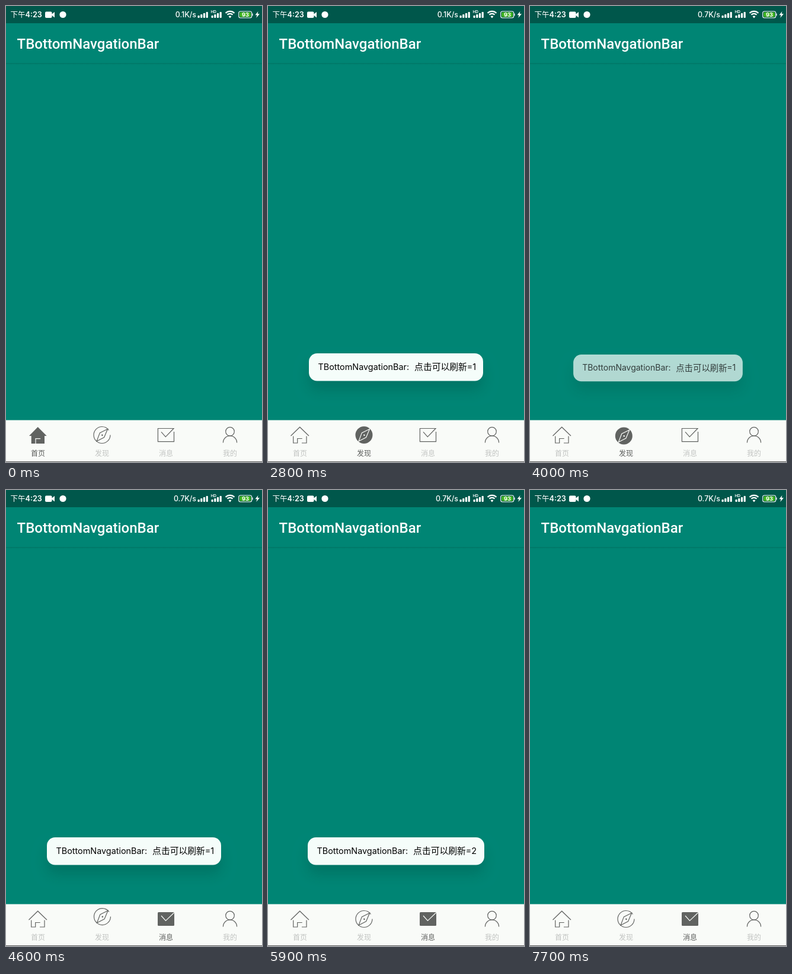
These frames come from a looping animation (432 px wide and 768 px high, 7.8 s). An HTML page with a canvas:

```html
<!DOCTYPE html>
<html lang="zh-CN">
<head>
<meta charset="utf-8">
<title>TBottomNavgationBar</title>
<style>
html, body { margin: 0; width: 100%; height: 100%; overflow: hidden; background: #008574; }
canvas { display: block; width: 432px; height: 768px; }
</style>
</head>
<body>
<canvas id="stage" width="432" height="768"></canvas>
<script>
const ctx = document.getElementById('stage').getContext('2d');
const LOOP = 7800, STEP = 100, FADE = 250, SHAKE = 900;
const TEAL = '#008574', DARK = '#00574b', PAPER = '#f9fbf8', INK = '#616361';
const LATIN = 'Inter, sans-serif', CJK = '"Noto Sans CJK SC", "Noto Sans CJK", sans-serif';
const LABELS = ['首页', '发现', '消息', '我的'];

// number shown, start of fade-in, start of fade-out
const TOASTS = [[0, 990, 2200], [1, 2370, 3600], [1, 3882, 4700], [2, 4982, 7000]];
// tab, start, starting angle in degrees
const SHAKES = [[0, 950, 150], [1, 2800, 90], [1, 3850, 37], [2, 4950, 195], [2, 5900, 20]];

const clamp = v => Math.max(0, Math.min(1, v));
const easeOut = v => 1 - (1 - v) ** 2;

function text(str, x, y, font, color, align = 'left') {
  ctx.font = font;
  ctx.fillStyle = color;
  ctx.textAlign = align;
  ctx.fillText(str, x, y);
}

function trace(points, close) {
  ctx.beginPath();
  points.forEach(([x, y]) => ctx.lineTo(x, y));
  if (close) ctx.closePath();
}

function line(points, color = INK, close = false) {
  trace(points, close);
  ctx.strokeStyle = color;
  ctx.stroke();
}

function area(points, color = INK) {
  trace(points, true);
  ctx.fillStyle = color;
  ctx.fill();
}

function arc(x, y, r, from = 0, to = 360) {
  ctx.beginPath();
  ctx.arc(x, y, r, from * Math.PI / 180, to * Math.PI / 180);
}

function dot(x, y, r, color) {
  arc(x, y, r);
  ctx.fillStyle = color;
  ctx.fill();
}

function box(x, y, w, h, r, color) {
  ctx.beginPath();
  ctx.roundRect(x, y, w, h, r);
  ctx.fillStyle = color;
  ctx.fill();
}

function signal(x) {
  for (let i = 0; i < 4; i++) box(x + i * 4.7, 16 - i * 2, 3.2, 4 + i * 2, 1, '#fff');
}

function statusBar(t) {
  ctx.fillStyle = DARK;
  ctx.fillRect(0, 0, 432, 29);
  text('下午', 7.5, 19, '500 12.5px ' + CJK, '#fff');
  text('4:23', 32.5, 19, '600 12.6px ' + LATIN, '#fff');
  box(66, 9.5, 11.5, 10.5, 2, '#fff');
  area([[76, 14.7], [82, 10], [82, 19.5]], '#fff');
  dot(96, 14.5, 5.6, '#fff');
  text(t < 3300 ? '0.1K/s' : '0.7K/s', 321, 19, '500 12.4px ' + LATIN, '#fff', 'right');
  signal(323.5);
  signal(346.5);
  ctx.fillStyle = DARK;
  ctx.fillRect(345, 6, 11, 6.5);
  text('HD', 345.5, 12, '600 6.5px ' + LATIN, '#fff');

  ctx.strokeStyle = '#fff';
  ctx.lineWidth = 2.2;
  for (const r of [10.5, 6.4]) {
    arc(378, 19.3, r, 225, 315);
    ctx.stroke();
  }
  arc(378, 20, 3.4, 225, 315);
  ctx.lineTo(378, 20.5);
  ctx.fillStyle = '#fff';
  ctx.fill();

  ctx.lineWidth = 1.1;
  ctx.beginPath();
  ctx.roundRect(392.7, 9, 22, 11, 3);
  ctx.stroke();
  box(394.3, 10.6, 18.8, 7.8, 1.5, '#40b51f');
  box(415.3, 12.5, 1.3, 4, 0.5, '#fff');
  text('93', 404, 18, '700 9.4px ' + LATIN, '#fff', 'center');
  area([[425.5, 9], [420.5, 15.3], [423.6, 15.3], [422.3, 20], [428, 13.3], [424.6, 13.3]], '#fff');
}

function appBar() {
  const g = ctx.createLinearGradient(0, 96, 0, 99);
  g.addColorStop(0, 'rgba(0,50,40,.2)');
  g.addColorStop(1, 'rgba(0,50,40,0)');
  ctx.fillStyle = g;
  ctx.fillRect(0, 96, 432, 3);
  text('TBottomNavgationBar', 18.6, 71.5, '500 24px Roboto, sans-serif', '#fff');
}

// Icons are drawn around their own centre.
const ICONS = [
  on => {
    if (on) {
      area([[-15, 1.5], [-.3, -13.5], [14.7, 1.5], [11, 1.5], [11, 14.5], [-11.3, 14.5], [-11.3, 1.5]]);
      line([[-4, 14.5], [-4, 6.2], [4.2, 6.2]], PAPER);
    } else {
      line([[-15.5, 1.5], [-.3, -13.3], [15, 1.5]]);
      line([[-11.3, 2], [-11.3, 13.5], [-4.3, 13.5], [-4.3, 6], [3.7, 6]]);
      line([[11, 2], [11, 13.5], [3, 13.5]]);
    }
  },
  on => {
    const tone = on ? PAPER : INK;
    if (on) dot(0, 0, 14.5, INK);
    else {
      arc(0, 0, 14, 0, 325);
      ctx.strokeStyle = INK;
      ctx.stroke();
    }
    line([[9.5, -10], [3.6, 4], [-9, 10.5], [-3.6, -3.6]], tone, true);
    dot(.4, .2, 1.3, tone);
  },
  on => {
    if (on) {
      box(-14, -11.5, 28, 23, 1.5, INK);
      line([[-8, -5.5], [-.5, 3], [13.5, -10.5]], PAPER);
    } else {
      line([[13.5, -5.5], [13.5, 11.2], [-13.6, 11.2], [-13.6, -11], [13, -11], [-.7, 3.2], [-8, -5.2]]);
    }
  },
  () => {
    ctx.strokeStyle = INK;
    arc(0, -5.8, 7.3);
    ctx.stroke();
    arc(0, 13, 11.6, 180, 360);
    ctx.stroke();
  }
];

function shakeOffset(tab, t) {
  for (const [who, start, angle] of SHAKES) {
    const u = t - start;
    if (who !== tab || u < 0 || u > SHAKE) continue;
    const r = 4 * clamp(Math.min(u, SHAKE - u) / 80);
    const a = (angle + u * .8) * Math.PI / 180;
    return [r * Math.cos(a), r * Math.sin(a)];
  }
  return [0, 0];
}

function navBar(t) {
  const active = t < 2200 ? 0 : t < 4600 ? 1 : 2;
  ctx.fillStyle = PAPER;
  ctx.fillRect(0, 697.5, 432, 70.5);
  ctx.fillStyle = '#555';
  ctx.fillRect(0, 767, 432, 1);
  LABELS.forEach((label, i) => {
    const x = 54 + i * 108, on = i === active;
    const [dx, dy] = shakeOffset(i, t);
    ctx.save();
    ctx.translate(x + dx, 722.5 + dy);
    ctx.lineWidth = 1.2;
    ICONS[i](on);
    ctx.restore();
    text(label, x, 757.6, '12px ' + CJK, on ? '#5c5e5c' : '#c2c4c2', 'center');
  });
}

function toast(n, alpha) {
  const w = n === 1 ? 294 : 298, left = 15.5 - w / 2;
  ctx.save();
  ctx.translate(216, 608.2 + (1 - alpha) * 5);
  ctx.scale(.9 + .1 * alpha, .9 + .1 * alpha);
  ctx.globalAlpha = alpha;
  ctx.shadowColor = 'rgba(0,50,40,.2)';
  ctx.shadowBlur = 22;
  ctx.shadowOffsetY = 16;
  box(-w / 2, -23.3, w, 46.6, 14, '#f5fdfa');
  ctx.shadowColor = 'transparent';
  text('TBottomNavgationBar:', left, 5, '14.4px ' + LATIN, '#000');
  text('点击可以刷新', left + 162.6, 5.2, '14.8px ' + CJK, '#000');
  text('=' + n, left + 251.2, 5, '14.4px ' + LATIN, '#000');
  ctx.restore();
}

function draw(t) {
  ctx.fillStyle = TEAL;
  ctx.fillRect(0, 0, 432, 768);
  statusBar(t);
  appBar();
  navBar(t);
  for (const [n, start, end] of TOASTS) {
    const alpha = easeOut(clamp((t - start) / FADE)) * (1 - clamp((t - end) / FADE));
    if (alpha > 0) toast(n, alpha);
  }
}

const began = performance.now();
function tick() {
  const t = (performance.now() - began) % LOOP;
  draw(Math.floor(t / STEP) * STEP);
  requestAnimationFrame(tick);
}
tick();
</script>
</body>
</html>
```
